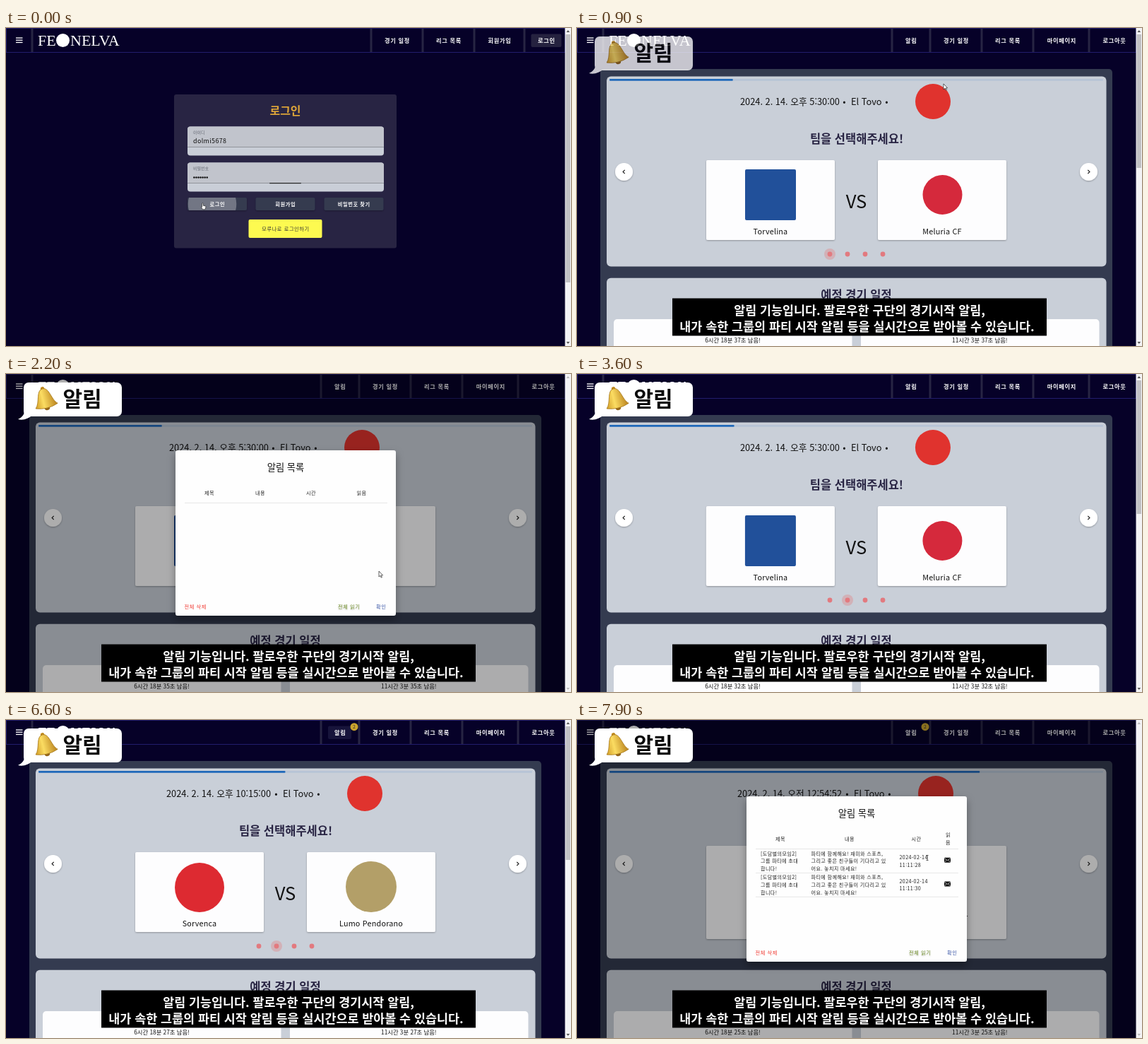
An HTML page for the animation above (8000 ms loop, 800x450 px).

```html
<!DOCTYPE html>
<html lang="ko">
<head>
<meta charset="utf-8">
<style>
html, body { margin: 0; width: 100%; height: 100%; overflow: hidden; background: #060128; }
svg { display: block; width: 100%; height: 100%; }
text { font-family: "Noto Sans CJK KR", "Noto Sans KR", "Noto Sans CJK", "Noto Sans", sans-serif; white-space: pre; }
.mid { text-anchor: middle; }
.nav { font-size: 8.2px; font-weight: 700; letter-spacing: .7px; fill: #fff; }
.btn { font-size: 7.2px; font-weight: 500; letter-spacing: .6px; }
.cell { font-size: 7.1px; letter-spacing: .38px; fill: #222; }
.head { font-size: 16.5px; font-weight: 700; fill: #282443; }
.date { font-size: 12.8px; fill: #111; }
.team { font-size: 10.8px; letter-spacing: .2px; fill: #111; }
.timer { font-size: 8.3px; fill: #111; }
.cap { font-size: 17.4px; font-weight: 700; fill: #fff; }
.logo { font-family: "Liberation Serif", "Noto Serif", serif; font-size: 22px; fill: #fff; }
</style>
</head>
<body>
<svg id="stage" viewBox="0 0 800 450"></svg>
<script>
const LOOP = 8000, SLIDES = [0, 3590, 7130], SLIDE_MS = 180, LOGIN_END = 300;
const DIALOGS = [[1500, 2500], [7250, 9999]], FADE = 130;
// time, x, y
const PATH = [[300, 400, 180], [900, 519, 79], [1400, 473, 17], [1600, 473, 17], [2200, 528, 279],
  [2450, 531, 326], [2600, 531, 326], [2800, 525, 400], [6000, 525, 400], [6450, 473, 17],
  [7300, 473, 17], [7750, 496, 195]];

const rect = (x, y, w, h, fill, r = 0, more = '') =>
  `<rect x="${x}" y="${y}" width="${w}" height="${h}" rx="${r}" fill="${fill}" ${more}/>`;
const disc = (x, y, r, fill, more = '') => `<circle cx="${x}" cy="${y}" r="${r}" fill="${fill}" ${more}/>`;
const text = (x, y, cls, str, more = '') => `<text x="${x}" y="${y}" class="${cls}" ${more}>${str}</text>`;
const path = (d, more) => `<path d="${d}" ${more}/>`;
const group = (id, body, more = '') => `<g id="${id}" ${more}>${body}</g>`;
const SHADOW = 'filter="url(#shadow)"';

const navBar = (bars, items) =>
  rect(.5, .5, 791, 34, '#060128', 0, 'stroke="#211c6c"') +
  [37, ...bars].map(x => rect(x - 1.5, 1, 3, 33, '#272543')).join('') +
  [14, 17.2, 20.4].map(y => rect(14, y - .6, 9.5, 1.3, '#fff')).join('') +
  text(45, 25, 'logo', 'FE') + disc(80.5, 17.5, 9.5, '#fff') + text(91, 25, 'logo', 'NELVA') +
  items.map(([x, s]) => text(x, 21, 'nav mid', s)).join('');

const scrollBar = thumb =>
  rect(791.5, 0, 8.5, 450, '#f3f3f5') + (thumb ? rect(792.5, 9, 6.5, thumb, '#c1c1c4') : '') +
  path('M793.5 6l2.3-3 2.3 3zM793.5 444l2.3 3 2.3-3z', `fill="${thumb ? '#555' : '#bbb'}"`);

const field = (y, label) =>
  rect(257, y, 278, 41, '#c9ced7', 4) + rect(257, y, 278, 29, '#c1c4cc', 4) +
  rect(257, y + 28.6, 278, .8, '#85878f') +
  text(265, y + 10.3, '', label, 'font-size="6" fill="#666a75"');

const login = rect(0, 0, 800, 450, '#060128') +
  navBar([517, 590, 663, 734], [[554, '경기 일정'], [627, '리그 목록'], [699, '회원가입']]) +
  rect(743.5, 8.5, 43, 18.5, '#25223f', 2) + text(765.3, 21, 'nav mid', '로그인') +
  rect(238, 94, 315, 217.5, '#282443', 3) +
  text(395.5, 123, 'mid', '로그인', 'font-size="16" font-weight="700" fill="#dfa638"') +
  field(139.5, '아이디') + text(265, 163, '', 'dolmi5678', 'font-size="8.9" letter-spacing=".4" fill="#111"') +
  field(190.5, '비밀번호') +
  [...Array(7).keys()].map(i => disc(266.4 + i * 3.05, 211.6, 1.25, '#111')).join('') +
  rect(373, 219, 45, 1.2, '#222', 0, 'id="focus"') +
  [[257, '로그인'], [353.5, '회원가입'], [450.5, '비밀번호 찾기']].map(([x, s], i) =>
    rect(x, 240, 84, 18, '#343b50', 2, SHADOW) +
    (i ? '' : '<g clip-path="url(#button)">' + disc(292, 249, 34, '#fff', 'id="ripple" opacity=".3"') + '</g>') +
    text(x + 42.3, 252, 'btn mid', s, 'fill="#fff" style="font-weight:700"')).join('') +
  rect(343.5, 271, 104, 26, '#fdfa50', 2) +
  text(396, 287, 'btn mid', '모루나로 로그인하기', 'fill="#333"') +
  path('M277.6 248.2q1-.8 1.6 0v3l3 .7q1 .4.6 2l-.8 2.8h-3.4l-2.2-3.2q.2-1 1.2-.2z',
    'fill="#fff" stroke="#111" stroke-width=".6"') +
  scrollBar(351);

const teamCard = (x, y, h, name, mark) =>
  rect(x, y, 182, h, '#fdfdfe', 2, SHADOW) + mark + text(x + 91, y + h - 8, 'team mid', name);

const slide = (i, x, when, league, y, h, teams, marks) => group('slide' + i,
  text(x, 109, 'date', when) + text(league - 9.5, 109, 'date mid', '•') +
  text(league, 109, 'date', 'El Tovo') + text(league + 50.5, 109, 'date mid', '•') +
  disc(league + 116, 104, 25, '#e0332e') +
  text(396, 162.8, 'head mid', '팀을 선택해주세요!') + text(395.5, 254.5, 'mid', 'VS', 'font-size="25.6" fill="#111"') +
  teams.map((name, k) => teamCard(183 + k * 243, y, h, name, marks[k])).join(''));

const arrow = (x, dir) => disc(x, 203.5, 12.5, '#fff', SHADOW) +
  path(`M${x - dir * 1.2} 200.8l${dir * 2.6} 2.7l${-dir * 2.6} 2.7`, 'fill="none" stroke="#222" stroke-width="1.2"');

const home = rect(0, 0, 800, 450, '#060128') +
  navBar([446, 500, 573, 646, 725], []) +
  rect(456, 8.5, 33, 18.5, '#17143b', 2, 'id="hover"') +
  [[473.3, '알림'], [537, '경기 일정'], [610, '리그 목록'], [686.3, '마이페이지'], [761, '로그아웃']]
    .map(([x, s]) => text(x, 21, 'nav mid', s)).join('') +
  group('badge', disc(493, 9.7, 5.5, '#caa42c') +
    text(493, 12, 'mid', '1', 'id="count" font-size="6.2" fill="#2a2340"')) +
  rect(33, 58, 725, 400, '#343b50', 5) +
  rect(42, 68.6, 707.5, 268.9, '#c9cfd8', 6) +
  rect(46, 72, 699, 2.8, '#b7c4d6', 1) + rect(46, 72, 175, 2.8, '#2069ba', 1, 'id="bar"') +
  '<g clip-path="url(#carousel)">' +
  slide(0, 231, '2024. 2. 14. 오후 5:30:00', 388, 187, 113, ['Torvelina', 'Meluria CF'],
    [rect(238, 200, 72, 72, '#21509a', 2), disc(517.5, 236, 28, '#d5293c')]) +
  slide(1, 227, '2024. 2. 14. 오후 10:15:00', 392, 187, 113, ['Sorvenca', 'Lumo Pendorano'],
    [disc(274, 237, 35, '#dd2a31'), disc(517, 236, 36, '#b39f68')]) +
  slide(2, 227, '2024. 2. 14. 오전 12:54:52', 392, 178, 132, ['', ''],
    [disc(274, 227, 34, '#5b6b9b'), disc(517, 227, 34, '#5b6b9b') + text(517, 283, 'team mid', 'Ostra Fellover')]) +
  '</g>' + arrow(66.5, -1) + arrow(724.5, 1) +
  disc(358, 320, 8, '#e57373', 'id="halo" opacity=".32"') +
  [358, 383, 408, 433].map(x => disc(x, 320, 3.4, '#e27a7f')).join('') +
  rect(42, 353.8, 707.5, 110, '#c9cfd8', 6) + text(395.5, 384.2, 'head mid', '예정 경기 일정') +
  rect(52, 412, 337.5, 60, '#fdfdfe', 5) + rect(402, 412, 337.5, 60, '#fdfdfe', 5) +
  text(220.5, 445, 'timer mid', '', 'id="left"') + text(570.3, 445, 'timer mid', '', 'id="right"');

const rule = y => rect(253, y, 287, .8, '#e2e2e2');
const heads = list => list.map(([x, s, y = 171]) => text(x, y, 'cell mid', s, 'style="font-weight:500"')).join('');
const lines = (x, y, list) => list.map((s, i) => text(x, y + i * 10.9, 'cell', s)).join('');
const message = (y, time) =>
  lines(260, y + 9, ['[도담별의모임2]', '그룹 파티에 초대', '합니다!']) +
  lines(331.5, y + 9, ['파티에 함께해요! 재미와 스포츠,', '그리고 좋은 친구들이 기다리고 있', '어요. 놓치지 마세요!']) +
  lines(456.5, y + 14.3, ['2024-02-14', time]) +
  rect(520, y + 12.3, 9, 7, '#111', 1) +
  path(`M520.3 ${y + 13.2}l4.2 3 4.2-3M520.3 ${y + 18.7}l2.8-2.6M528.7 ${y + 18.7}l-2.8-2.6`,
    'fill="none" stroke="#fff" stroke-width=".7"') + rule(y + 33.6);

const dialog = rect(240, 108, 312, 234, '#fefefe', 3, 'filter="url(#deep)"') +
  text(396, 136.5, 'mid', '알림 목록', 'font-size="13.3" font-weight="300" fill="#111"') + rule(182) +
  group('empty', heads([[288, '제목'], [360, '내용'], [432, '시간'], [503.5, '읽음']])) +
  group('full', heads([[288, '제목'], [386, '내용'], [480.5, '시간'], [525.5, '읽', 165], [525.5, '음', 176]]) +
    message(182.5, '11:11:28') + message(216.2, '11:11:30')) +
  text(252.5, 331.5, 'btn', '전체 삭제', 'fill="#f03a32"') +
  text(470, 331.5, 'btn', '전체 읽기', `fill="#73902f" ${SHADOW}`) +
  text(524, 331.5, 'btn', '확인', 'fill="#2c4aa0"');

const bubble =
  path('M27 49C27 57 22 62 17 64C24 66 33 63 37 58Z', 'fill="#fff"') + rect(25, 12, 139, 48, '#fff', 7) +
  '<g transform="translate(55 34.5) rotate(-14)">' + disc(0, -14, 2.8, '#c08a1e') + disc(0, 13, 4, '#94661a') +
  path('M-16 11C-8 4-10-14 0-14S8 4 16 11Q0 17-16 11Z', 'fill="url(#gold)" stroke="#a97a1c" stroke-width=".8"') + '</g>' +
  text(108, 46.3, 'mid', '알림', 'font-size="30" font-weight="900" fill="#0b0b0b"');

const caption = rect(135, 382.5, 530, 53, '#000') +
  text(400, 405.9, 'cap mid', '알림 기능입니다. 팔로우한 구단의 경기시작 알림,') +
  text(396.5, 428.7, 'cap mid', '내가 속한 그룹의 파티 시작 알림 등을 실시간으로 받아볼 수 있습니다.');

stage.innerHTML = `<defs>
  <filter id="shadow" x="-20%" y="-20%" width="140%" height="160%"><feDropShadow dx="0" dy="1" stdDeviation="1" flood-opacity=".3"/></filter>
  <filter id="deep" x="-20%" y="-20%" width="140%" height="150%"><feDropShadow dx="0" dy="5" stdDeviation="6" flood-opacity=".35"/></filter>
  <clipPath id="button">${rect(257, 240, 84, 18, '#000', 2)}</clipPath>
  <clipPath id="carousel">${rect(42, 76, 707.5, 261, '#000')}</clipPath>
  <linearGradient id="gold"><stop offset="0" stop-color="#d09a24"/><stop offset=".4" stop-color="#fbdc62"/><stop offset="1" stop-color="#b8801c"/></linearGradient>
</defs>` +
  group('homePage', home + rect(0, 0, 792, 450, '#000', 0, 'id="scrim"') +
    group('scroll', scrollBar(189)) + group('locked', scrollBar(0)) + group('dialog', dialog) +
    group('cursor',
      path('M0 0v8l1.9-1.7 1.3 2.9 1.2-.6-1.3-2.7h2.5z', 'id="pointer" fill="#fff" stroke="#222" stroke-width=".7"') +
      path('M-1.5-3.5h3M0-3.5v7M-1.5 3.5h3', 'id="beam" fill="none" stroke="#333" stroke-width=".8"'))) +
  group('loginPage', login) + group('captionBox', caption) + group('bubble', bubble);

const el = id => document.getElementById(id);
const set = (id, name, value) => el(id).setAttribute(name, value);
const show = (id, on) => set(id, 'display', on ? 'inline' : 'none');
const clamp = v => Math.max(0, Math.min(1, v));
const ease = p => p * p * (3 - 2 * p);

function pathAt(t) {
  const i = PATH.findIndex(p => p[0] > t);
  if (i < 1) return PATH.at(i).slice(1);
  const [a, b] = [PATH[i - 1], PATH[i]], p = ease((t - a[0]) / (b[0] - a[0]));
  return [a[1] + (b[1] - a[1]) * p, a[2] + (b[2] - a[2]) * p];
}

function draw(t) {
  show('loginPage', t < LOGIN_END);
  show('homePage', t >= LOGIN_END);
  set('ripple', 'r', 34 + t * .25);
  const half = 22.5 * clamp(1 - t / 120);
  set('focus', 'x', 395.5 - half);
  set('focus', 'width', half * 2);

  // The bar runs evenly, the slides ease in gently.
  const current = SLIDES.filter(s => t >= s).length - 1;
  const part = clamp((t - SLIDES[current]) / SLIDE_MS);
  const moved = current ? current - 1 + ease(part) ** 2 : 0;
  SLIDES.forEach((_, i) => {
    show('slide' + i, Math.abs(i - moved) < 1);
    set('slide' + i, 'transform', `translate(${(i - moved) * 707.5} 0)`);
  });
  set('bar', 'width', 174.75 * (current ? current + ease(part) : 1));
  set('halo', 'cx', 358 + 25 * current);

  const seconds = Math.floor(37.5 - 1.7 * (t - 900) / 1000);
  el('left').textContent = `6시간 18분 ${seconds}초 남음!`;
  el('right').textContent = `11시간 3분 ${seconds}초 남음!`;

  show('badge', t >= 4300);
  el('count').textContent = t < 5500 ? 1 : 2;
  show('hover', (t > 1350 && t < 1500) || (t > 6400 && t < 7250));

  const open = Math.max(...DIALOGS.map(([a, b]) => Math.min(clamp((t - a) / FADE), clamp((b + FADE - t) / FADE))));
  const scale = .9 + .1 * ease(open);
  set('scrim', 'opacity', .32 * open);
  set('dialog', 'opacity', open);
  set('dialog', 'transform', `translate(396 225) scale(${scale}) translate(-396 -225)`);
  show('dialog', open > 0);
  show('locked', open > 0);
  show('scroll', open === 0);
  show('empty', t < 5000);
  show('full', t >= 5000);

  set('cursor', 'transform', `translate(${pathAt(t)})`);
  show('cursor', t < 6450 || t > 7300);
  show('pointer', t < 7700);
  show('beam', t >= 7700);
  show('captionBox', t >= 500);
  set('bubble', 'opacity', clamp((t - 500) / 520));
}

const start = performance.now();
function tick() {
  draw((performance.now() - start) % LOOP);
  requestAnimationFrame(tick);
}
tick();
</script>
</body>
</html>
```
